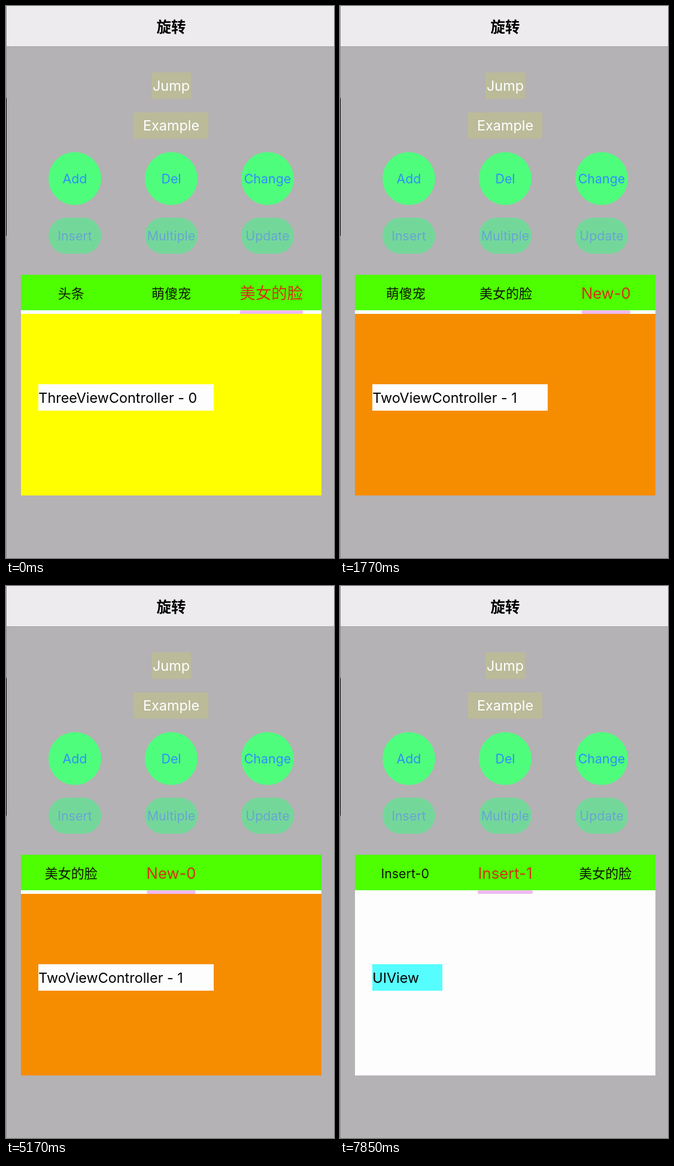
These frames come from a looping animation (548x918 px, 8000 ms). An HTML page:

```html
<!DOCTYPE html>
<html lang="zh">
<head>
<meta charset="utf-8">
<title>旋转</title>
<style>
  html, body { margin: 0; width: 100%; height: 100%; overflow: hidden; background: #b4b2b4; }
  svg { display: block; width: 100%; height: 100%; }
  text { font-family: Inter, "Noto Sans CJK SC", "Noto Sans CJK", sans-serif; white-space: pre; }
  .mid { text-anchor: middle; }
  .body { font-size: 23.4px; }
  .small { font-size: 21.4px; }
  .han { font-size: 22px; }
</style>
</head>
<body>
<svg viewBox="0 0 548 918" xmlns="http://www.w3.org/2000/svg">
  <defs>
    <clipPath id="bar"><rect x="25" y="447" width="502" height="59"/></clipPath>
    <clipPath id="panel"><rect x="25" y="447" width="502" height="367"/></clipPath>
  </defs>
  <rect width="548" height="918" fill="#b4b2b4"/>
  <rect width="548" height="67" fill="#edebee"/>
  <rect y="67" width="548" height="1" fill="#a3a1a4"/>
  <rect width="1" height="918" fill="#8b898b"/>
  <rect y="153" width="1" height="229" fill="#000"/>
  <text class="mid" x="276" y="43.5" font-size="24.5" font-weight="600">旋转</text>
  <g class="mid body" fill="#fff">
    <rect x="243" y="110.5" width="66" height="44" fill="#bbbb9a"/>
    <text x="276" y="141">Jump</text>
    <rect x="213.5" y="177" width="124.5" height="43.5" fill="#bbbb9a"/>
    <text x="276" y="207">Example</text>
  </g>
  <g id="buttons" class="mid small"></g>
  <rect x="25" y="447" width="502" height="367" fill="#fdfdfd"/>
  <g id="pages" clip-path="url(#panel)"></g>
  <rect x="25" y="447" width="502" height="59" fill="#4dff00"/>
  <g id="tabs" clip-path="url(#bar)"></g>
  <g clip-path="url(#panel)">
    <rect id="mark" y="506.3" height="5.7" rx="2.8" fill="#f0b8f2"/>
  </g>
</svg>
<script>
const LOOP = 8000, TICK = 147.5;
const LEFT = 25, WIDTH = 502, SLOT = WIDTH / 3;
const $ = id => document.getElementById(id);
const lerp = (a, b, p) => a + (b - a) * p;
const ease = (t, from, ms) => {
  const u = Math.min(1, Math.max(0, (t - from) / ms));
  return u * u * (3 - 2 * u);
};

const PET = '萌傻宠', FACE = '美女的脸', NEW = 'New-0', IN0 = 'Insert-0', IN1 = 'Insert-1';
const textWidth = { [FACE]: 88, [NEW]: 68, [IN0]: 81, [IN1]: 77 };
const slotX = i => LEFT + SLOT * (i + .5);

// Taps: press time, release time, length of the fade back
const taps = {
  Add: [[140, 400, 330]],
  Del: [[2940, 3190, 300], [3535, 3690, 290]],
  Insert: [[5745, 6140, 400], [6925, 7320, 400]]
};

function labelOpacity(name, t) {
  let o = 1;
  for (const [down, up, fade] of taps[name] || [])
    if (t >= down) o = Math.min(1, .2 + .8 * Math.max(0, t - up) / fade);
  return o;
}

function buildButtons() {
  const names = ['Add', 'Del', 'Change', 'Insert', 'Multiple', 'Update'];
  $('buttons').innerHTML = names.map((name, i) => {
    const x = 115 + 161 * (i % 3), round = i < 3;
    const [y, h, fill, ink, base] = round
      ? [243, 88, '#4ffd7d', '#2e90f8', 295] : [352, 60, '#74d79a', '#68a5d2', 390.3];
    return `<rect x="${x - 44}" y="${y}" width="88" height="${h}" rx="${h / 2}" fill="${fill}"/>
      <text id="${name}" x="${x}" y="${base}" fill="${ink}">${name}</text>`;
  }).join('');
}

function page(x, color, label, boxWidth = 293, boxColor = '#fdfdfd') {
  return `<g transform="translate(${x} 0)">
    <rect y="512" width="${WIDTH}" height="302" fill="${color}"/>
    <rect x="29" y="629" width="${boxWidth}" height="44" fill="${boxColor}"/>
    <text class="body" x="29.3" y="660">${label}</text></g>`;
}

function tab(name, x, grow = 0, red = grow) {
  const ink = [[12, 212], [22, 52], [4, 18]].map(([a, b]) => Math.round(lerp(a, b, red)));
  const kind = /[A-Z]/.test(name) ? 'small' : 'han';
  return `<text class="mid ${kind}" y="8.3" fill="rgb(${ink})"
    transform="translate(${x} 477.3) scale(${1 + .2 * grow})">${name}</text>`;
}

// Each scene gives the tabs, the pages and the marker as [centre, text width]
function scene(t) {
  const three = page(LEFT, '#ff0', 'ThreeViewController - 0');
  const two = page(LEFT, '#f68d00', 'TwoViewController - 1');
  const plain = page(LEFT, '#fdfdfd', 'UIView', 117, '#55fdff');

  if (t < 3190) {
    const p = ease(t, 990, 480);
    const scroll = 166.3 * ease(t, 1475, 285);
    const x = i => slotX(i) - scroll;
    const added = t > 400 ? tab(NEW, x(3), p) : '';
    const pages = p === 0 ? three : p === 1 ? two :
      page(LEFT - p * WIDTH, '#ff0', 'ThreeViewController - 0') +
      page(LEFT + WIDTH - p * WIDTH, '#f68d00', 'TwoViewController - 1');
    return {
      tabs: tab('头条', x(0)) + tab(PET, x(1)) + tab(FACE, x(2), 1 - p) + added,
      pages,
      mark: [lerp(x(2), x(3), p), lerp(textWidth[FACE], textWidth[NEW], p)]
    };
  }
  if (t < 3600) return {
    tabs: tab(PET, slotX(0)) + tab(FACE, slotX(1)) + tab(NEW, slotX(2), 1),
    pages: two, mark: [slotX(2), textWidth[NEW]]
  };
  if (t < 6141) return {
    tabs: tab(FACE, slotX(0)) + tab(NEW, slotX(1), 1),
    pages: two, mark: [slotX(1), textWidth[NEW]]
  };
  if (t < 7321) {
    const p = ease(t, 6141, 300);
    return {
      tabs: tab(IN0, slotX(0), p, 1) + tab(FACE, slotX(1)) + tab(NEW, slotX(2)),
      pages: plain,
      mark: [lerp(slotX(1), slotX(0), p), lerp(textWidth[NEW], textWidth[IN0], p)]
    };
  }
  const p = ease(t, 7321, 300);
  return {
    tabs: tab(IN0, slotX(0)) + tab(IN1, slotX(1), p, 1) + tab(FACE, slotX(2)),
    pages: plain,
    mark: [lerp(slotX(0), slotX(1), p), lerp(textWidth[IN0], textWidth[IN1], p)]
  };
}

let shown = -1;
function render(ms) {
  const step = Math.floor(ms % LOOP / TICK);
  if (step === shown) return;
  shown = step;
  const t = step * TICK, s = scene(t);
  for (const name in taps) $(name).setAttribute('opacity', labelOpacity(name, t));
  $('tabs').innerHTML = s.tabs;
  $('pages').innerHTML = s.pages;
  const [x, w] = s.mark;
  $('mark').setAttribute('x', x - w * .6);
  $('mark').setAttribute('width', w * 1.2);
}

buildButtons();
render(0);
const start = performance.now();
(function loop() {
  render(performance.now() - start);
  requestAnimationFrame(loop);
})();
</script>
</body>
</html>
```
